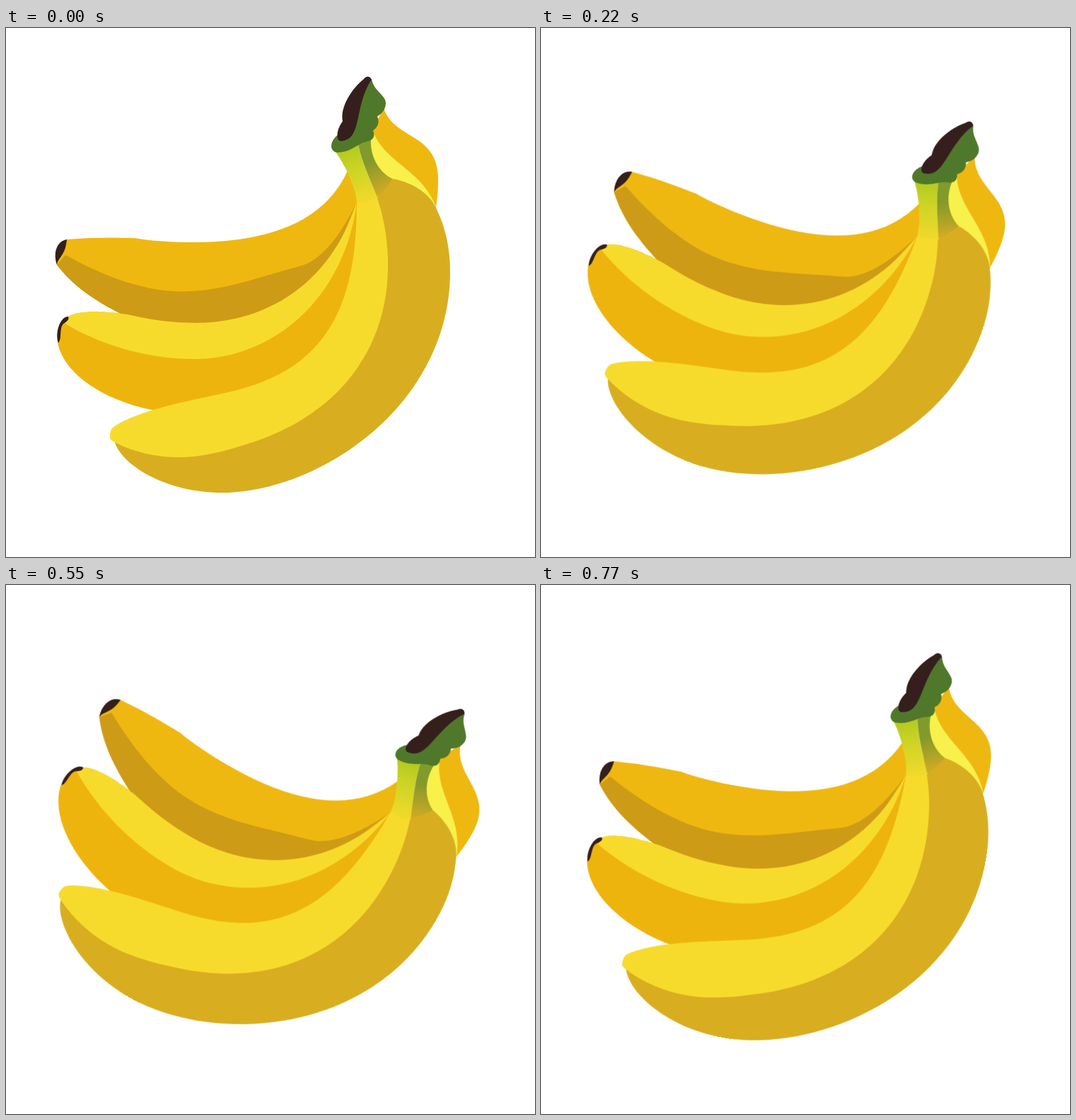
An HTML page that plays this animation: 748x748 px, repeating every 880 ms.

```html
<!DOCTYPE html>
<html lang="en">
<head>
<meta charset="utf-8">
<title>Bananas</title>
<style>
  html, body { margin: 0; width: 100%; height: 100%; overflow: hidden; background: #fff; }
  svg { display: block; width: 100%; height: 100%; }
  .bunch { transform-origin: 378.6px 372.6px; animation: rock 880ms steps(4) infinite; }
  .orange { fill: #efb810; }
  .amber { fill: #eeb40e; }
  .yellow { fill: #f7db2c; }
  .lemon { fill: #f8f04b; }
  .brown { fill: #ce9b17; }
  .ochre { fill: #d8ae20; }
  .green { fill: #50782a; }
  .dark { fill: #351f1c; }
  @keyframes rock { 50% { transform: rotate(40deg); } }
  @keyframes rock {
    0%, 100% { transform: rotate(0deg); }
    50% { transform: rotate(40deg); }
  }
</style>
</head>
<body>
<svg viewBox="0 0 748 748">
  <defs>
    <linearGradient id="lime" gradientUnits="userSpaceOnUse" x1="484" y1="168" x2="509" y2="247">
      <stop offset="0" stop-color="#b2c91f"/>
      <stop offset=".42" stop-color="#ced425"/>
      <stop offset="1" stop-color="#f1da2b"/>
    </linearGradient>
    <linearGradient id="olive" gradientUnits="userSpaceOnUse" x1="506" y1="165" x2="535" y2="232">
      <stop offset="0" stop-color="#7f9c2b"/>
      <stop offset=".35" stop-color="#84992b"/>
      <stop offset="1" stop-color="#d0ab23"/>
    </linearGradient>
  </defs>
  <g class="bunch">
    <!-- Back banana -->
    <path class="orange" d="M85,299 C120,296 150,296 182,297 C205,301 235,303 265,303 C370,303 450,275 483,202
      L500,246 L440,380 L300,430 L170,408 L162,404 C125,385 95,365 72,335 C68,320 74,303 85,299Z"/>
    <path class="brown" d="M72,335 L84,321 C130,346 185,371 245,372.5 C305,373 355,353 418,336 C448,327 475,290 496,246
      L440,380 L300,430 L170,408 L162,404 C125,385 95,365 72,335Z"/>
    <path class="dark" d="M86,299 C72,301 66,318 72,335 C73,324 84,323 86,299Z"/>

    <!-- Middle banana -->
    <path class="amber" d="M87,409 C100,398 150,400 185,408 C213,414 240,417 268,417 C370,417 460,360 496,246
      L505,300 L480,470 L300,560 L212,541 C140,528 82,490 73,445 C72,430 75,416 87,409Z"/>
    <path class="yellow" d="M87,409 C100,398 150,400 185,408 C213,414 240,417 268,417 C370,417 460,360 496,246
      C480,375 385,468 265,468 C205,468 138,451 82,417Z"/>
    <path class="dark" d="M88,408 C76,408 69,432 74,445 C80,440 74,421 83,417 C86,415 90,412 88,408Z"/>

    <!-- Far end of the back banana -->
    <path class="orange" d="M534,113 C548,158 612,148 611,215 C611,230 610,240 608,253 L570,235 L515,150Z"/>
    <path class="lemon" d="M519,146 C535,190 588,200 608,253 L590,245 L545,220 L510,190 L514,155Z"/>

    <!-- Front banana -->
    <path class="ochre" d="M154,586 C164,618 226,657 305,657 C444,657 628,532 628,345 C628,310 621,280 607,252
      C596,232 572,217 545,213 L525,238 L500,300 L470,440 L360,540Z"/>
    <path class="yellow" d="M147,577 C148,566 149,566 160,559 C202,537 260,527 310,516 C450,486 496,400 496,246
      L524,238 C535,270 540,300 540,335 C540,455 470,545 351,585 C315,597 280,607 245,607
      C212,607 182,600 154,586 C148,583 146,580 147,577Z"/>

    <!-- Stem and cap -->
    <path fill="url(#lime)" d="M464,172 C480,195 495,225 496,247 C508,247 518,244 526,240 C512,209 502,187 497,160Z"/>
    <path fill="url(#olive)" d="M497,160 C502,187 513,210 525,239 C532,233 540,224 546,213 C526,203 514,180 516,154Z"/>
    <path class="green" d="M517,72 C520,90 538,95 537,107 C536,117 531,121 525,125 C529,134 525,141 519,145
      C523,153 518,159 512,160 C497,163 488,176 468,176 C456,174 458,158 471,150 L495,110Z"/>
    <path class="dark" d="M517,73 C514,67 509,68 505,73 C489,86 472,112 476,132 C468,142 465,159 474,160
      C505,157 491,112 517,73Z"/>
  </g>
</svg>
</body>
</html>
```
